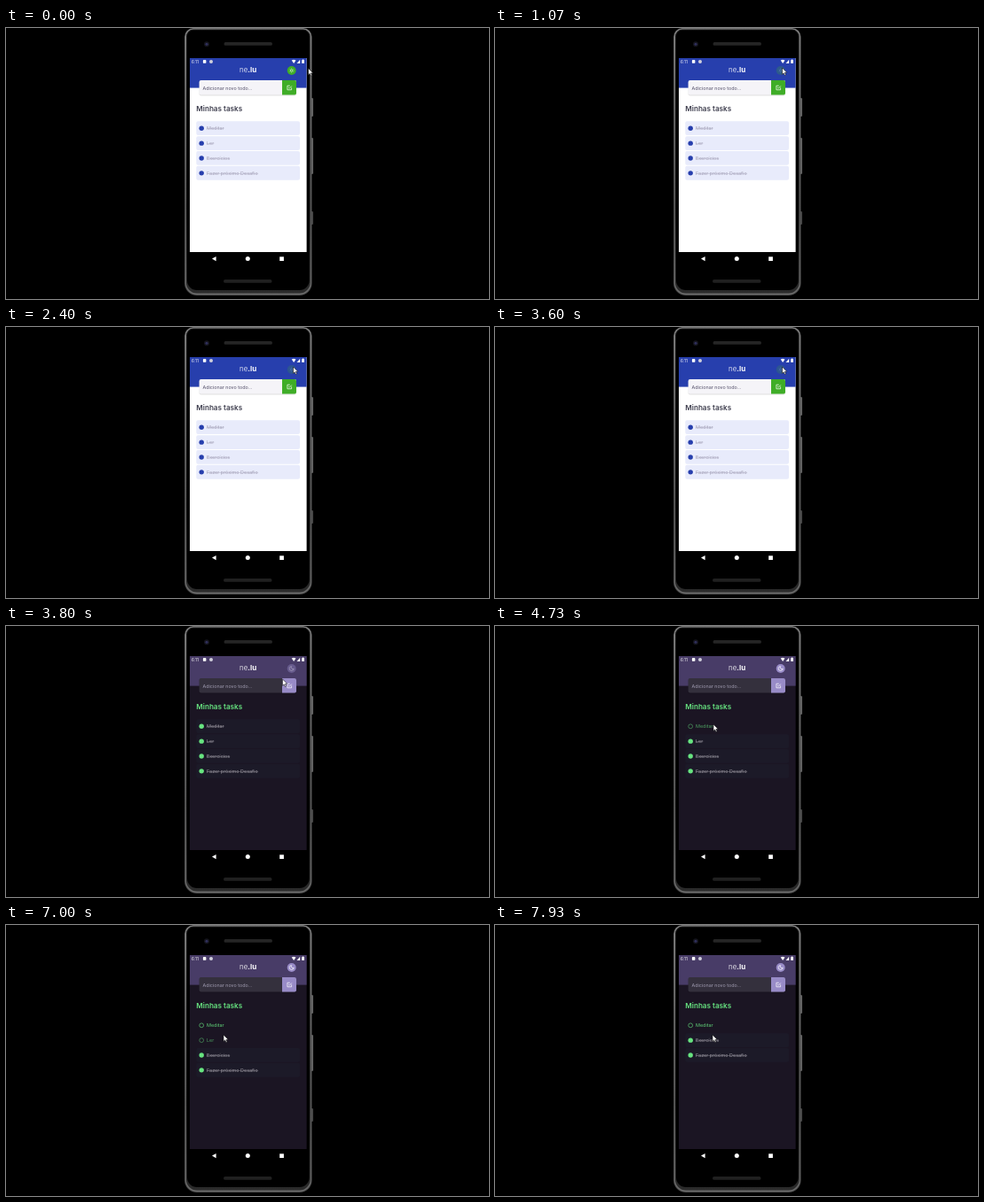
An HTML page with a canvas for the animation above (8 s loop, 544 px wide and 306 px high).

```html
<!DOCTYPE html>
<html lang="pt">
<head>
<meta charset="utf-8">
<title>Minhas tasks</title>
<style>
html, body { margin: 0; width: 100%; height: 100%; overflow: hidden; background: #000; }
canvas { display: block; width: 544px; height: 306px; }
</style>
</head>
<body>
<canvas id="stage"></canvas>
<script>
const LOOP = 8000, W = 544, H = 306;
const canvas = document.getElementById('stage');
const ctx = canvas.getContext('2d');
const ratio = window.devicePixelRatio || 1;
canvas.width = W * ratio;
canvas.height = H * ratio;

const FONT = 'Inter, "Open Sans", sans-serif';
const light = {
  header: '#273fad', body: '#ffffff', input: '#f5f4f8', hint: '#55516a', button: '#3fad27',
  title: '#3d3d4d', row: '#e8ebfb', dot: '#273fad', done: '#a5a2b8', open: '#3d3d4d'
};
const dark = {
  header: '#483c67', body: '#1b1523', input: '#34303d', hint: '#a09cb1', button: '#988bc7',
  title: '#67e480', row: '#1c1a28', dot: '#67e480', done: '#97949d', open: '#5fd077'
};

// Time of each theme switch and task event
const SWITCHES = [1130, 2400, 3670];
const REMOVED = 7070;
const tasks = [
  { text: 'Meditar', openAt: 4730 },
  { text: 'Ler', openAt: 5470, removed: true },
  { text: 'Exercícios' },
  { text: 'Fazer próximo Desafio' }
];
// Presses: start, release
const togglePresses = [[930, 1130], [2000, 2400], [3270, 3720]];
const taskPresses = [
  [[4600, 4730]], [[5330, 5470], [6400, 7070]], [[5600, 5930], [7420, 7680]], []
];
// Pointer tip: time, x, y
const path = [
  [70, 340.5, 45.5], [400, 323.5, 45], [3670, 323.5, 45], [3800, 311.5, 60],
  [4130, 266, 97], [4400, 246, 111], [4800, 246, 111], [5130, 246, 128],
  [5500, 246, 128], [5700, 246, 144.5], [5930, 246, 144.5], [6400, 245, 124]
];

const clamp = v => Math.max(0, Math.min(1, v));
const smooth = v => v * v * (3 - 2 * v);

function pressAlpha(t, presses, low) {
  let alpha = 1;
  for (const [start, end] of presses) {
    const amount = clamp((t - start) / 150) * (1 - smooth(clamp((t - end) / 250)));
    alpha = Math.min(alpha, 1 - (1 - low) * amount);
  }
  return alpha;
}

function pointerAt(t) {
  let a = path[0];
  for (const b of path) {
    if (t < b[0]) {
      const k = smooth(clamp((t - a[0]) / (b[0] - a[0])));
      return [a[1] + (b[1] - a[1]) * k, a[2] + (b[2] - a[2]) * k];
    }
    a = b;
  }
  return [a[1], a[2]];
}

function rect(x, y, w, h, color) {
  ctx.fillStyle = color;
  ctx.fillRect(x, y, w, h);
}

function round(x, y, w, h, r, color) {
  ctx.beginPath();
  ctx.roundRect(x, y, w, h, r);
  ctx.fillStyle = color;
  ctx.fill();
}

function disc(x, y, r, color) {
  ctx.beginPath();
  ctx.arc(x, y, r, 0, Math.PI * 2);
  ctx.fillStyle = color;
  ctx.fill();
}

function ring(x, y, r, color, width) {
  ctx.beginPath();
  ctx.arc(x, y, r, 0, Math.PI * 2);
  ctx.strokeStyle = color;
  ctx.lineWidth = width;
  ctx.stroke();
}

function poly(points, color) {
  ctx.beginPath();
  points.forEach(([x, y]) => ctx.lineTo(x, y));
  ctx.closePath();
  ctx.fillStyle = color;
  ctx.fill();
}

function text(str, x, y, size, weight, color) {
  ctx.font = `${weight} ${size}px ${FONT}`;
  ctx.fillStyle = color;
  ctx.fillText(str, x, y);
  return ctx.measureText(str).width;
}

function shade(...colors) {
  const fill = ctx.createLinearGradient(0, 0, 0, 302);
  colors.forEach((c, i) => fill.addColorStop(i / (colors.length - 1), c));
  return fill;
}

function drawPhone() {
  for (const [y, h] of [[79, 21], [124, 41], [207, 15]]) {
    round(343.5, y, 2.4, h, 1, y < 200 ? '#747474' : '#505050');
  }
  // Metal rim: dark outside, bright middle, dark inside
  const corners = inset => [10, 10, 14, 14].map(r => r - inset);
  round(201, 0, 143.6, 302, corners(0), shade('#5a5a5a', '#484848', '#404040', '#484848'));
  round(201.8, 0.6, 142, 300.6, corners(0.8), shade('#8a8a8a', '#6c6c6c', '#5c5c5c', '#686868'));
  round(203, 1.6, 139.6, 298, corners(2), shade('#1c1c1c', '#161616', '#141414', '#2c2c2c'));
  round(204, 2.6, 137.6, 293.4, corners(3), '#000');
  round(245.5, 16, 54.5, 3.8, 1.9, '#252525');
  round(245, 284, 54.5, 3.8, 1.9, '#202020');
  disc(226, 18.3, 3, '#15151d');
  disc(226, 18.3, 1.5, '#30305c');
}

function drawStatus() {
  text('6:11', 209, 39.5, 4.5, 400, '#fff');
  round(221.9, 36, 3.5, 3.8, 0.9, '#fff');
  disc(231, 38, 2, '#d0d0dc');
  poly([[321.7, 36.4], [324, 35.7], [326.5, 36.4], [324.1, 39.9]], '#fff');
  poly([[327.6, 39.9], [331.2, 39.9], [331.2, 35.8]], '#fff');
  rect(333.2, 36.1, 2.7, 3.8, '#fff');
  rect(333.9, 35.5, 1.3, 0.8, '#fff');
}

function drawToggle(theme, alpha) {
  const x = 321.7, y = 48;
  ctx.globalAlpha = alpha;
  disc(x, y, 5, theme.button);
  if (theme === light) {
    ring(x, y, 1.3, '#fff', 0.6);
    for (let i = 0; i < 8; i++) {
      const a = i * Math.PI / 4;
      disc(x + 2.5 * Math.cos(a), y + 2.5 * Math.sin(a), 0.3, '#fff');
    }
  } else {
    // Crescent opening to the upper right
    ctx.beginPath();
    ctx.arc(x, y, 2.5, 0.1, 4.6);
    ctx.arc(x + 1.3, y - 1.2, 1.8, 3.8, 0.9, true);
    ctx.closePath();
    ctx.strokeStyle = '#fff';
    ctx.lineWidth = 0.7;
    ctx.stroke();
  }
  ctx.globalAlpha = 1;
}

function drawInput(theme) {
  round(217.6, 59.6, 109.4, 16.8, 2, 'rgba(0,0,0,0.12)');
  round(217.6, 59, 109.4, 16.6, 2, theme.input);
  round(311, 59, 16, 16.6, [0, 2, 2, 0], theme.button);
  text('Adicionar novo todo...', 221.5, 69.6, 5.4, 400, theme.hint);
  ctx.strokeStyle = '#fff';
  ctx.lineWidth = 0.7;
  ctx.beginPath();
  ctx.moveTo(319.8, 65.2);
  ctx.lineTo(316.9, 65.2);
  ctx.lineTo(316.9, 69.8);
  ctx.lineTo(321.6, 69.8);
  ctx.lineTo(321.6, 67.4);
  ctx.moveTo(318.3, 67.2);
  ctx.lineTo(319.3, 68.2);
  ctx.lineTo(321.8, 65.5);
  ctx.stroke();
}

function drawTask(task, y, theme, done, alpha) {
  if (done) round(214.3, y - 8, 116.7, 15.8, 2, theme.row);
  ctx.globalAlpha = alpha;
  if (done) disc(220.2, y, 2.7, theme.dot);
  else ring(220.2, y, 2.4, theme.dot, 0.6);
  const color = done ? theme.done : theme.open;
  const width = text(task.text, 226, y + 2, 5.45, 400, color);
  if (done) rect(226, y + 0.2, width, 0.4, color);
  ctx.globalAlpha = 1;
}

function drawPointer(x, y) {
  const shape = [[0, 0], [0, 7.4], [1.7, 5.9], [2.9, 8.5], [4.1, 7.9], [3, 5.4], [5.2, 5.2]]
    .map(([dx, dy]) => [x + dx, y + dy]);
  poly(shape, '#fff');
  ctx.strokeStyle = '#111';
  ctx.lineWidth = 0.6;
  ctx.stroke();
}

function draw(t) {
  ctx.setTransform(ratio, 0, 0, ratio, 0, 0);
  rect(0, 0, W, H, '#000');
  const theme = SWITCHES.filter(s => t >= s).length % 2 ? dark : light;

  drawPhone();
  rect(207, 34, 131.6, 219, theme.body);
  rect(207, 34, 131.6, 33.6, theme.header);
  drawStatus();
  const w = text('ne', 263, 50.2, 8, 300, '#fff');
  text('.lu', 263 + w, 50.2, 8, 700, '#fff');
  drawToggle(theme, pressAlpha(t, togglePresses, 0.2));
  drawInput(theme);
  text('Minhas tasks', 214.3, 94.4, 8.15, 600, theme.title);

  let row = 0;
  tasks.forEach((task, i) => {
    if (task.removed && t >= REMOVED) return;
    const done = !(t >= task.openAt);
    drawTask(task, 113.3 + 16.85 * row++, theme, done, pressAlpha(t, taskPresses[i], 0.7));
  });

  poly([[232, 260.6], [236.6, 258], [236.6, 263.2]], '#fff');
  disc(272.3, 260.6, 2.5, '#fff');
  rect(308.2, 258.3, 4.7, 4.7, '#fff');
  drawPointer(...pointerAt(t));
}

const begin = performance.now();
function tick() {
  draw((performance.now() - begin) % LOOP);
  requestAnimationFrame(tick);
}
tick();
</script>
</body>
</html>
```
